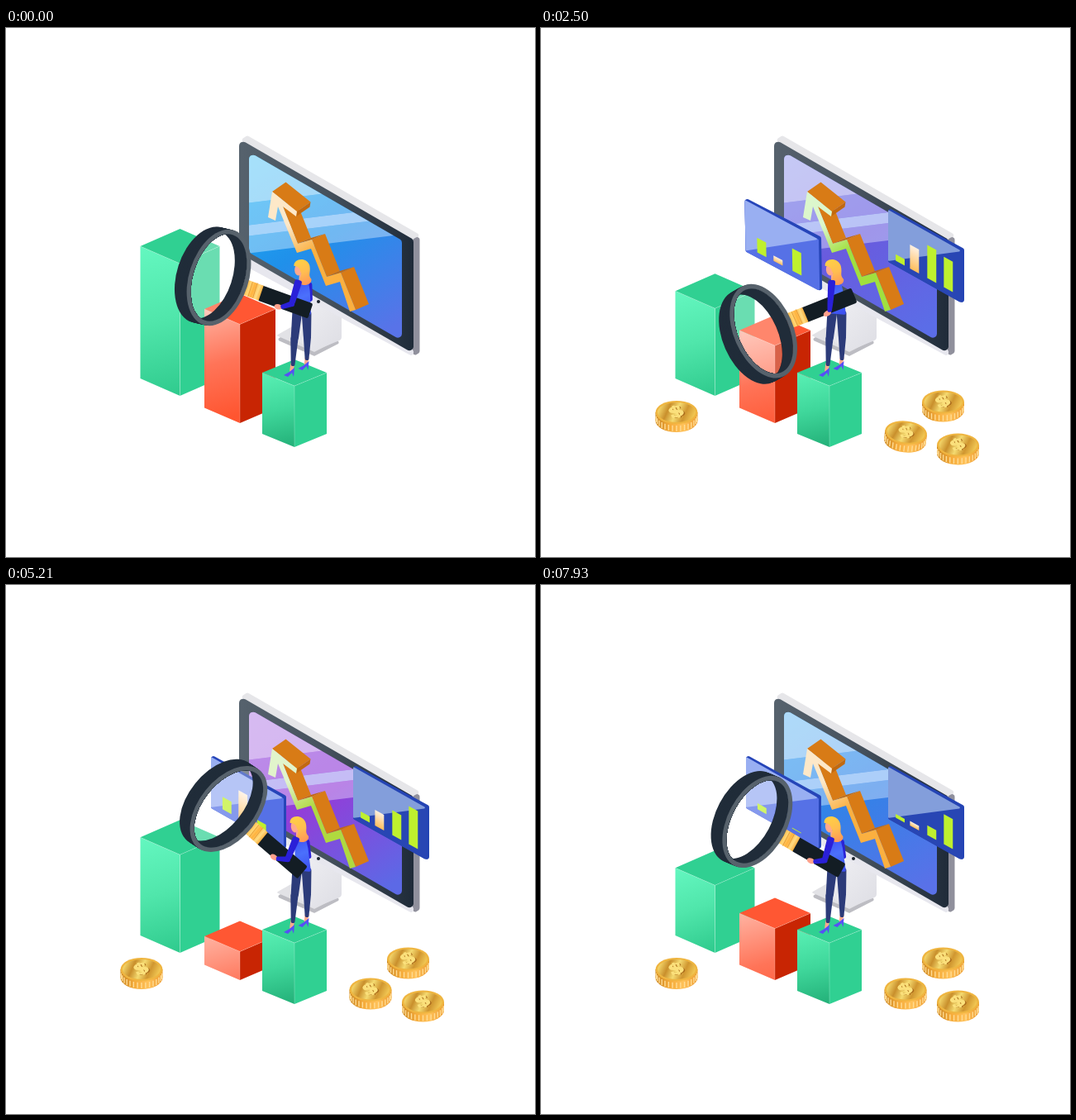
Recreate the animation shown at these times as an HTML page with a canvas. Size 640 by 640 pixels, loop 8000 ms.

```html
<!DOCTYPE html>
<html lang="en">
<head>
<meta charset="utf-8">
<title>Growth dashboard</title>
<style>
html, body { margin: 0; width: 100%; height: 100%; overflow: hidden; background: #fff; }
canvas { display: block; width: 640px; height: 640px; }
</style>
</head>
<body>
<canvas id="stage" width="640" height="640"></canvas>
<script>
const ctx = document.getElementById('stage').getContext('2d');
const LOOP = 8000;
const SLOPE = .578;          // fall of the isometric screen plane
const BEAT = 2360;           // cycle of the small charts
const PIVOT = [348.4, 319];  // point the magnifier swings around
const TAU = Math.PI * 2;

const clamp = (x, a = 0, b = 1) => Math.min(b, Math.max(a, x));
const lerp = (a, b, k) => a + (b - a) * k;
const ease = k => (1 - Math.cos(Math.PI * clamp(k))) / 2;
const blend = (a, b, k) => `rgb(${a.map((v, i) => Math.round(lerp(v, b[i], k)))})`;
const rad = deg => deg * Math.PI / 180;

// Eased travel from one turning point [time, value] to the next
function glide(t, ...stops) {
  const i = Math.max(1, stops.findIndex((s, n) => t < s[0] || n === stops.length - 1));
  const [a, b] = [stops[i - 1], stops[i]];
  return lerp(a[1], b[1], ease((t - a[0]) / (b[0] - a[0])));
}

// Linear rise from 0, then linear fall back to 0 at `end`
const riseFall = (t, rise, end, fall) => clamp(Math.min(t / rise, (end - t) / fall));

function gradient(x0, y0, x1, y1, ...colors) {
  const g = ctx.createLinearGradient(x0, y0, x1, y1);
  colors.forEach((c, i) => g.addColorStop(i / (colors.length - 1), c));
  return g;
}

function trace(points, r = 0) {
  const n = points.length, at = i => points[i % n];
  const mid = at(0).map((v, i) => (v + at(n - 1)[i]) / 2);
  ctx.beginPath();
  ctx.moveTo(...mid);
  for (let i = 0; i < n; i++) ctx.arcTo(...at(i), ...at(i + 1), r);
  ctx.closePath();
}

function poly(fill, points, r) {
  trace(points, r);
  ctx.fillStyle = fill;
  ctx.fill();
}

function oval(fill, x, y, rx, ry, rot = 0) {
  ctx.beginPath();
  ctx.ellipse(x, y, rx, ry, rot, 0, TAU);
  ctx.fillStyle = fill;
  ctx.fill();
}

function line(...points) {
  ctx.beginPath();
  points.forEach(p => ctx.lineTo(...p));
  ctx.stroke();
}

function scoped(draw) {
  ctx.save();
  draw();
  ctx.restore();
}

// Upright parallelogram in the screen plane
const slab = (x, y, w, h) => [[x, y], [x + w, y + w * SLOPE], [x + w, y + w * SLOPE + h], [x, y + h]];

// Quad through two points swept by a vector
const sweep = (a, b, [dx, dy]) => [a, b, [b[0] + dx, b[1] + dy], [a[0] + dx, a[1] + dy]];

function limb(fill, [x0, y0], w0, [x1, y1], w1) {
  const len = Math.hypot(x1 - x0, y1 - y0), nx = (y1 - y0) / len / 2, ny = (x0 - x1) / len / 2;
  poly(fill, [[x0 - nx * w0, y0 - ny * w0], [x0 + nx * w0, y0 + ny * w0],
    [x1 + nx * w1, y1 + ny * w1], [x1 - nx * w1, y1 - ny * w1]], Math.min(w0, w1) * .4);
}

function drawStand() {
  const base = [[327, 372], [350, 359], [406, 375], [373, 392]];
  poly('#bdbdc3', base.map(([x, y]) => [x, y + 5]), 2);
  poly('#e2e2e6', base, 1);
  poly(gradient(350, 330, 406, 380, '#f0f0f4', '#dfdfe5'), [[350, 318], [406, 345], [406, 377], [372, 391], [345, 373]], 5);
}

function drawMonitor(t) {
  drawStand();
  poly('#e6e6e9', sweep([283, 136], [493, 257], [9, -6]), 3);
  poly('#90909c', sweep([492, 256], [492, 398], [8.5, -5.5]), 3);
  poly('#e7e7ee', [[282, 270], [493, 390], [493, 398], [282, 284]], 3);
  poly(gradient(282, 0, 493, 0, '#56626d', '#45515d', '#1f2b39'), slab(282, 134, 211, 138), 5);
  oval('#1b242e', 378, 331, 2, 2);
  const hue = riseFall(t, 3900, 8430, 2940);
  scoped(() => {
    trace(slab(294, 150, 185, 121.5), 5);
    ctx.clip();
    ctx.fillStyle = gradient(294, 150, 440, 380,
      blend([25, 180, 245], [150, 80, 222], hue),
      blend([32, 144, 234], [146, 62, 216], hue),
      blend([88, 115, 232], [92, 105, 230], hue));
    ctx.fillRect(290, 145, 195, 240);
    let top = 130;
    for (const [bottom, tint] of [[212, '255,255,255,.61'], [239, '255,255,255,.36'], [252, '215,232,255,.74'], [273, '255,255,255,.36']]) {
      poly(`rgba(${tint})`, [[290, top], [485, top - 24], [485, bottom - 24], [290, bottom]]);
      top = bottom;
    }
  });
}

function drawArrow(t) {
  const green = riseFall(t, 3100, 7930, 4000);
  const depth = [16, -7], run = [18, 45], jog = [17, -5];
  const top = '#d87b16', shade = '#c2690f';
  const path = [[335, 216]];
  for (let i = 0; i < 5; i++) {
    const [x, y] = path[i], [dx, dy] = i % 2 ? jog : run;
    path.push([x + dx, y + dy]);
  }
  for (let i = 0; i < 5; i++) poly(i % 2 ? shade : top, sweep(path[i], path[i + 1], depth));
  const tip = [322, 198], wing = [352, 222], back = [16.5, -11.5];
  poly(shade, sweep(wing, [351, 228], back));
  poly(top, sweep(tip, wing, back));
  const pale = blend([253, 232, 200], [212, 250, 205], green);
  const deep = blend([251, 176, 64], [140, 236, 62], green);
  const under = path.slice(1, 5).map(([x, y]) => [x - 1, y + 11]).reverse();
  poly(gradient(...tip, 420, 342, pale, pale, deep, deep, deep),
    [tip, wing, [351, 228], ...path, [416, 343], ...under, [329, 216], [326, 233], [317, 229]]);
}

// Panel spanned by its top-left, top-right and bottom-left corners
function drawCard(t, [[ax, ay], [bx, by], [cx, cy]], alpha, colors, bars) {
  if (alpha <= 0) return;
  const dx = bx + cx - ax, dy = by + cy - ay;
  scoped(() => {
    ctx.globalAlpha = alpha;
    poly(colors.edge, [[ax, ay - 1], [bx + 1, by - 1], [dx + 1, dy + 1], [cx, cy]], 3);
    poly(colors.face, [[ax, ay + 2], [bx - 2, by + 2], [dx - 2, dy], [cx, cy]], 2);
    poly(colors.light, [[ax, ay + 2], [bx - 2, by + 2], [cx, cy - 1]], 1);
    ctx.transform(bx - ax, by - ay, cx - ax, cy - ay, ax, ay);
    bars.forEach(({ x, max, peak, beats = 1 }, i) => {
      const h = Math.max(1, max * (1 + Math.cos(TAU * (t - peak) / (BEAT * beats))) / 2) / 65;
      ctx.fillStyle = i === 1 && bars.cream !== false ? gradient(0, .9 - h, 0, .9, '#fff0e0', '#ffbe5c') : '#bff02e';
      ctx.fillRect(x, .9 - h, .12, h);
    });
  });
}

function drawCards(t) {
  const move = (from, to, k) => from.map((p, i) => p.map((v, j) => lerp(v, to[i][j], k)));
  const landed = ease((t - 710) / 900);
  drawCard(t, move([[457, 194], [528, 267], [438, 257]], [[420, 218], [511, 268], [420, 283]], landed),
    clamp((t - 120) / 500), { edge: '#2444b4', face: '#2846b4', light: '#839edb' }, [
      { x: .1, max: 8, peak: 300 }, { x: .29, max: 30, peak: 0 },
      { x: .52, max: 40, peak: 100 }, { x: .74, max: 46, peak: 490 }]);
  drawCard(t, move([[244, 206], [338, 251], [247, 271]], [[248, 206], [338, 256], [248, 270]], clamp((t - 1860) / 1100)),
    clamp((t - 80) / 1050), { edge: '#2645b8', face: '#5671e6', light: '#99aff2' }, [
      { x: .155, max: 18, peak: 200 }, { x: .37, max: 36, peak: 800, beats: 2 },
      { x: .62, max: 37, peak: 2100 }]);
}

function drawBar(x, half, rise, topY, baseY, left, right, top) {
  const r = x + half, l = x - half, front = [x, topY + rise], foot = [x, baseY + rise];
  poly(right, [front, [r, topY], [r, baseY], foot]);
  poly(left, [[l, topY], front, foot, [l, baseY]]);
  poly(top, [[l, topY], [x, topY - rise], [r, topY], front]);
  ctx.strokeStyle = 'rgba(255,255,255,.28)';
  ctx.lineWidth = .8;
  line([l, topY], front, [r, topY]);
  line(front, foot);
}

function drawBars(t) {
  const green = '#30d092';
  const tall = glide(t, [0, 264], [3700, 335], [6400, 285], [8300, 348]);
  const red = glide(t, [0, 340], [2900, 367], [5600, 428], [8600, 393]);
  drawBar(210.5, 48, 21, tall, 424, gradient(162, tall, 200, 445, '#64f7c0', '#50e6ab', '#30cb8e'), green, green);
  drawBar(283, 43, 18.5, red, 459.5, gradient(240, red, 275, red + 130, '#ffb3a2', '#ff7458', '#ff5530'), '#c82503', '#ff5733');
  drawBar(349, 39, 16, 417, 491, gradient(320, 417, 340, 507, '#58efb3', '#3fd79b', '#24b179'), green, green);
}

function drawCoin(x, y, age) {
  if (age <= 0) return;
  const grow = 1 - (1 - clamp(age / 420)) ** 3;
  scoped(() => {
    ctx.translate(x, y);
    ctx.rotate(.2 * (1 - clamp(age / 1150)));
    ctx.scale(grow, grow);
    ctx.globalAlpha = clamp(age / 250);
    oval(gradient(-25, 0, 25, 0, '#c98420', '#f5ab3a', '#ffc158', '#ec9a30'), 0, 5, 25.5, 14);
    ctx.fillRect(-25.5, -5, 51, 10);
    ctx.strokeStyle = '#ffdc94';
    ctx.lineWidth = 1.4;
    for (let i = 1; i < 16; i++) {
      const a = Math.PI * i / 16, px = 25.2 * Math.cos(a), py = 14 * Math.sin(a);
      line([px, py - 3], [px, py + 4]);
    }
    oval('#efb540', 0, -5, 25.5, 14);
    oval(gradient(-20, -12, 18, 5, '#f3d468', '#c98f2c', '#f4da70', '#d09630', '#f0c552'), 0, -5, 23, 12);
    ctx.transform(1.15, -.35, .35, .62, 0, -5);
    ctx.font = 'bold 27px "Liberation Serif", serif';
    ctx.textAlign = 'center';
    ctx.textBaseline = 'middle';
    ctx.fillStyle = '#a96a1b';
    ctx.fillText('$', 1.5, 2);
    ctx.lineWidth = 1.4;
    ctx.strokeStyle = ctx.fillStyle = '#fbe07c';
    ctx.strokeText('$', 0, .5);
    ctx.fillText('$', 0, .5);
  });
}

function drawCoins(t) {
  [[164, 470], [486.5, 457.5], [504.5, 509.5], [441, 494.5]]
    .forEach(([x, y], i) => drawCoin(x, y, t - 150 - 630 * i));
}

function drawPerson(angle, lean) {
  const skin = '#ffa98c', navy = '#2c3b79';
  for (const [x, y] of [[347, 411], [364.5, 403]]) {
    limb(skin, [x, y - 6], 5, [x - 2, y + 5], 4);
    poly('#574ff6', [[x + 2, y], [x + 1, y + 11], [x - 1, y + 6], [x - 6, y + 11], [x - 11, y + 9], [x - 4, y + 5]]);
  }
  for (const [hip, knee, foot] of [[[352.5, 342], [349, 378], [347, 409]], [[363.5, 342], [364.5, 376], [364, 402]]]) {
    limb(navy, hip, 12, knee, 9);
    limb(navy, [knee[0], knee[1] - 4], 9.5, foot, 4.5);
  }
  // upper body leans around the waist
  scoped(() => {
    ctx.transform(1, 0, -lean / 52, 1, 347 * lean / 52, 0);
    ctx.globalAlpha = clamp((angle + 4) / 14);
    limb('#2a22d6', [365, 308], 6, [366.5, 331], 7);
    ctx.globalAlpha = 1;
    poly(gradient(350, 305, 366, 345, '#3b4ef2', '#4b70fc', '#3c50f0'),
      [[350, 305], [363, 304], [366, 318], [369, 347], [347, 345], [350, 328]], 2);
    limb(skin, [356, 297], 8, [356.5, 307], 9);
    oval(skin, 350.5, 292.5, 4.5, 7, -.1);
    ctx.beginPath();
    ctx.moveTo(345, 288);
    ctx.bezierCurveTo(344, 278, 361, 277, 364, 288);
    ctx.bezierCurveTo(366, 297, 362, 298, 367, 304);
    ctx.bezierCurveTo(368, 311, 358, 313, 353, 309);
    ctx.bezierCurveTo(351, 304, 357, 299, 353, 294);
    ctx.bezierCurveTo(352, 289, 348, 288, 345, 288);
    ctx.fillStyle = gradient(350, 281, 362, 311, '#ffcf45', '#ffbd50', '#ff9458');
    ctx.fill();
  });
}

function turned(x, y, deg) {
  const c = Math.cos(rad(deg)), s = Math.sin(rad(deg)), dx = x - PIVOT[0], dy = y - PIVOT[1];
  return [PIVOT[0] + dx * c - dy * s, PIVOT[1] + dx * s + dy * c];
}

function drawLens(deg) {
  const tilt = .09, y = 322.5, frontX = 256, backX = 241;
  const navy = '#202c39', outer = [36, 60, tilt], inner = [31, 54.5, tilt];
  const hole = x => ctx.ellipse(x, y, ...inner, 0, TAU);
  scoped(() => {
    ctx.translate(...PIVOT);
    ctx.rotate(rad(deg));
    ctx.translate(-PIVOT[0], -PIVOT[1]);
    // handle
    poly('#131d24', [[309, 320], [374, 328], [372, 347], [308, 339]], 2);
    poly(gradient(289, 326, 311, 329, '#ffae3e', '#ffd673', '#ffb23e', '#ffdc83', '#f8a936'),
      [[289, 317], [311, 320], [309, 339], [288, 336]]);
    ctx.strokeStyle = '#dd9130';
    ctx.lineWidth = .7;
    for (const x of [297, 303]) line([x, 318.5], [x - 1.5, 337.5]);
    // glass and inner wall
    scoped(() => {
      ctx.beginPath();
      hole(frontX);
      ctx.clip();
      oval('rgba(255,255,255,.28)', backX, y, ...inner);
      ctx.beginPath();
      ctx.rect(190, 240, 130, 160);
      hole(backX);
      ctx.fillStyle = navy;
      ctx.fill('evenodd');
    });
    // outer wall and front rim
    scoped(() => {
      ctx.beginPath();
      ctx.rect(180, 230, 150, 180);
      hole(frontX);
      ctx.clip('evenodd');
      for (let x = backX; x < frontX; x += 1.5) oval(navy, x, y, ...outer);
      oval('#57626c', frontX, y, ...outer);
    });
  });
}

function drawArm(deg, lean) {
  const [ex, ey] = turned(349, 334, deg), elbow = [Math.min(ex, 350), ey];
  const blue = '#2a20d8';
  oval('#ffa18b', ...turned(334, 341, deg), 5, 3.2, rad(deg));
  limb(blue, [352.5 + lean * .6, 305], 9, elbow, 7);
  oval(blue, ...elbow, 3.5, 3.5);
  limb(blue, elbow, 7, turned(337, 341, deg), 5);
}

function frame(now) {
  const t = now % LOOP;
  const angle = glide(t, [-500, 16], [2400, -29], [5700, 37], [9800, 12]);
  const lean = glide(t, [700, 3], [3200, -2], [6000, -1], [8000, -2]);
  ctx.fillStyle = '#fff';
  ctx.fillRect(0, 0, 640, 640);
  drawMonitor(t);
  drawArrow(t);
  drawCards(t);
  drawBars(t);
  drawCoins(t);
  drawPerson(angle, lean);
  drawLens(angle);
  drawArm(angle, lean);
  requestAnimationFrame(() => frame(performance.now() - begin));
}

const begin = performance.now();
frame(0);
</script>
</body>
</html>
```
